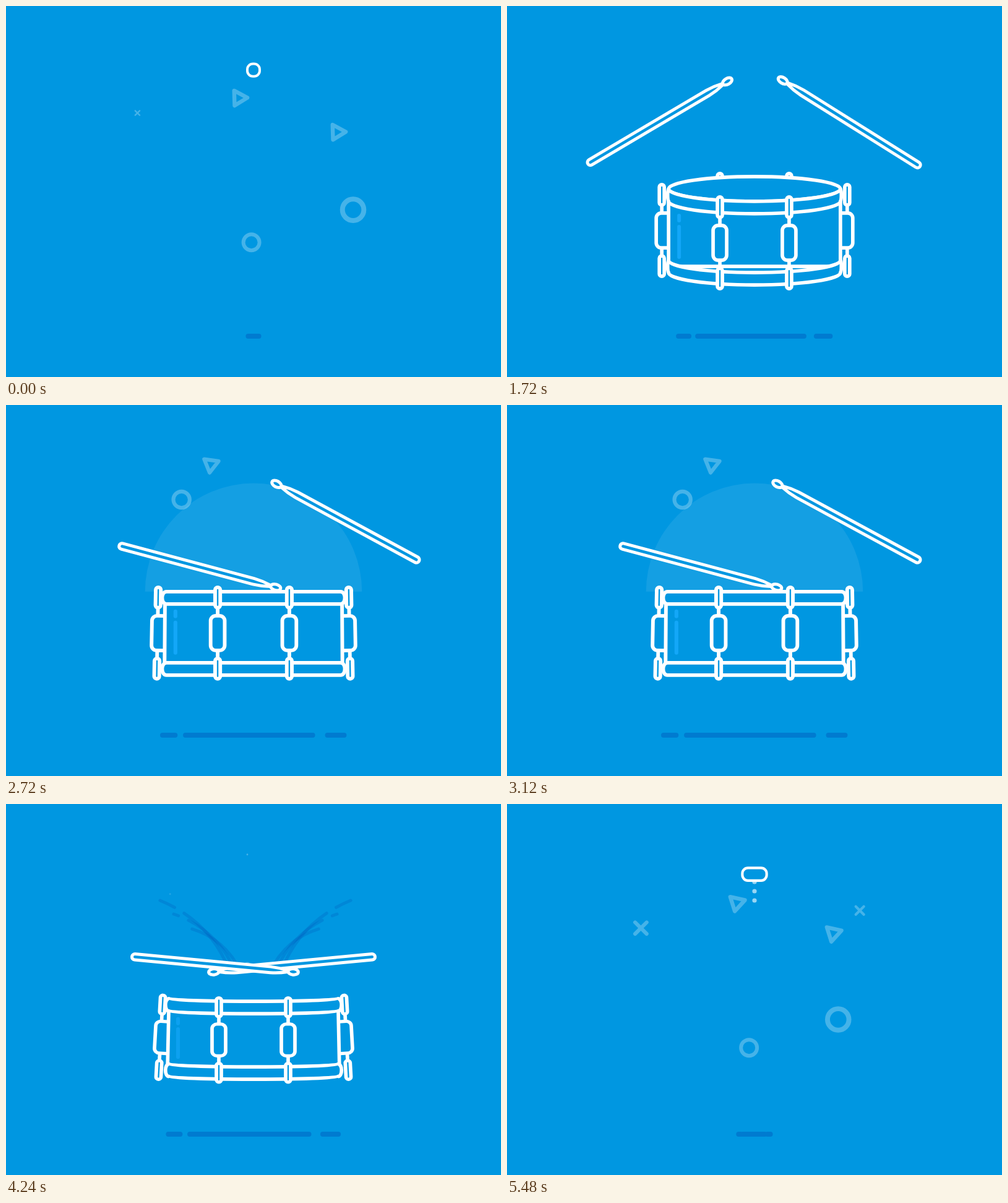
These frames come from a looping animation (800 px wide and 600 px high, 5.52 s). An HTML page with a canvas:

```html
<!DOCTYPE html>
<html>
<head>
<meta charset="utf-8">
<style>
html, body { margin: 0; width: 100%; height: 100%; overflow: hidden; background: #0097e1; }
canvas { display: block; }
</style>
</head>
<body>
<canvas id="stage" width="800" height="600"></canvas>
<script>
const c = document.getElementById('stage').getContext('2d');
const LOOP = 5520, LAND = 1040, OPEN = 1240, SLAM = 4180, CLOSE = 5240;
const ROLL = 2295, BEAT = 400, ROLL_END = 3900;
const BG = '#0097e1', WHITE = '#fff', PALE = 'rgba(255,255,255,.27)';
const RAD = Math.PI / 180, TAU = Math.PI * 2;

const clamp = (v, a = 0, b = 1) => Math.min(b, Math.max(a, v));
const mix = (a, b, w) => a + (b - a) * w;
const smooth = (a, b, t) => { const w = clamp((t - a) / (b - a)); return w * w * (3 - 2 * w); };
const settle = (age, tau) => 1 - Math.exp(-age / tau);
const arch = (a, b, t) => Math.sin(Math.PI * clamp((t - a) / (b - a)));
const kick = (age, up, down) => age < 0 ? 0 : age < up ? age / up : clamp(1 - (age - up) / down);

function pen(color, width) {
  c.strokeStyle = color;
  c.lineWidth = width;
}

function pill(x, y, w, h, r) {
  c.beginPath();
  c.roundRect(x, y, w, h, r);
  c.fill();
  c.stroke();
}

function dot(x, y, r, color) {
  c.fillStyle = color;
  c.beginPath();
  c.arc(x, y, Math.max(0, r), 0, TAU);
  c.fill();
}

function mark(type, x, y, r, turn = 0) {
  if (r < 0.2) return;
  const at = (deg, f) => c[f](x + r * Math.cos(deg * RAD), y + r * Math.sin(deg * RAD));
  pen(PALE, r * 0.46);
  c.beginPath();
  if (type === 'ring') c.arc(x, y, r, 0, TAU);
  if (type === 'cross') for (const a of [turn, turn + 90]) {
    at(a, 'moveTo');
    at(a + 180, 'lineTo');
  }
  if (type === 'tri') {
    at(turn, 'moveTo');
    at(turn + 120, 'lineTo');
    at(turn + 240, 'lineTo');
    c.closePath();
  }
  c.stroke();
}

// type, x, y, radius, drift x, drift y
const launchBits = [
  ['tri', 371, 160, 14, 5, -11],
  ['tri', 527, 209, 14, 8, -5],
  ['ring', 534.5, 349, 17.3, 26, -19],
  ['ring', 391, 394.5, 13, 5.5, -12],
  ['cross', 216.5, 201.5, 13.4, -4, -28],
  ['cross', 570, 172.5, 9.5, 6, -8]
];

function launchBurst(t) {
  const age = t < LAND ? t + 40 : t - 5480;
  if (age < -130 || age > 660) return;
  const g = 3.5 * settle(age, 119);
  const pop = smooth(-130, -50, age) * (1 - smooth(260, 650, age));
  for (const [type, x, y, r, dx, dy] of launchBits) {
    const fade = type === 'cross' ? 1 - clamp(age / (9 * (r - 6))) : 1;
    mark(type, x + dx * g, y + dy * g, r * pop * fade, type === 'cross' ? 45 : -18 + 16 * g);
  }
}

// type, x, y, radius, turn
const impactBits = [
  ['cross', 424, 470, 16.5, 45],
  ['cross', 355, 400.5, 13, 45],
  ['cross', 177.5, 337.5, 12, -5],
  ['ring', 266, 472.5, 11, 0],
  ['ring', 485, 237, 14.3, 0],
  ['tri', 396, 366, 13, 90],
  ['tri', 519, 460, 13, 90]
];

function streak(x, y, dx, dy, bend, w) {
  pen(PALE, w);
  c.beginPath();
  c.moveTo(x, y);
  c.quadraticCurveTo(x + dx / 2 - bend, y + dy / 2, x + dx, y + dy);
  c.stroke();
}

function impact(t) {
  const age = t - LAND;
  if (age < -40 || age > 600) return;
  if (age > 0 && age < 440) {
    const outer = 160 * settle(age, 211), w = Math.min(outer, 66 * (1 - age / 440));
    pen('rgba(0,110,200,.3)', w);
    c.beginPath();
    c.arc(400, 302, outer - w / 2, 0, TAU);
    c.stroke();
  }
  const g = settle(age + 40, 100) / settle(240, 100);
  const s = smooth(-40, 50, age) * (1 - smooth(250, 600, age));
  for (const [type, x, y, r, turn] of impactBits)
    mark(type, mix(400, x, g), mix(320, y, g), r * s, turn);
  c.fillStyle = PALE;
  c.beginPath();
  c.ellipse(400 + 37 * g, 320 - 206 * g, 9 * s, 11 * s, 0.2, 0, TAU);
  c.fill();
  const w = smooth(90, 180, age) * (1 - smooth(210, 380, age)), d = (age - 200) / 8;
  if (w > 0) {
    streak(279 - d, 222 - d, 30, 64, 3, 21 * w);
    streak(584 + d, 180 - d, -78, 101, 5, 16 * w);
  }
}

function hitBits(age, top) {
  if (age < 60 || age > 560) return;
  const glow = 0.08 * smooth(80, 180, age) * (1 - clamp((age - 425) / 70));
  dome(top, 179 * settle(age, 110), glow);
  const rise = settle(age, 100), pop = smooth(60, 160, age);
  mark('tri', 400 - 70 * rise, 300 - 207 * rise, 14 * pop * (1 - smooth(410, 560, age)), 98 + (age - 425) / 10);
  mark('ring', 400 - 118 * rise, 300 - 149 * rise, 13.2 * pop * (1 - smooth(470, 560, age)));
}

function dome(y, r, alpha) {
  c.fillStyle = `rgba(255,255,255,${alpha})`;
  c.beginPath();
  c.arc(400, y, r, Math.PI, TAU);
  c.fill();
}

function sparks(age) {
  if (age < 30 || age > 390) return;
  const s = smooth(30, 60, age) * (1 - smooth(250, 390, age)), up = age / 65;
  dot(390, 300 - 41 * up, 6 * s, PALE);
  mark('cross', 345 - 15 * up, 300 - 29 * up, 5 * s);
}

function hits(t, top) {
  for (let h = ROLL; h < ROLL_END; h += BEAT) {
    if (h < 3800) hitBits(t - h, top);
    if (h > ROLL) sparks(t - h);
  }
  sparks(t - SLAM);
}

function swoosh(t) {
  const alpha = 0.26 * smooth(SLAM - 50, SLAM + 20, t) * (1 - smooth(SLAM + 60, SLAM + 150, t));
  if (alpha <= 0) return;
  pen(`rgba(0,90,185,${alpha})`, 5);
  c.setLineDash([26, 18, 120, 14]);
  for (const side of [-1, 1]) for (let i = 0; i < 3; i++) {
    c.lineDashOffset = 18 * i;
    c.beginPath();
    c.moveTo(403 + side * (154 - 22 * i), 156 + 22 * i);
    c.quadraticCurveTo(403 + side * (72 - 10 * i), 190 + 12 * i, 403 + side * (42 - 9 * i), 270);
    c.stroke();
  }
  c.setLineDash([]);
}

// A pose is lift angle, butt distance from the middle, butt height, size.
function spinIn(age, side) {
  const u = 32 + side - 715 * Math.exp(-age / 88.7);
  const s = Math.sin(clamp(age / 333) * Math.PI / 2);
  const out = arch(180, 420, age);
  const x = 155 * smooth(110, 250, age) + 50 * out;
  const y = 310 - 125 * settle(age, 171) - 60 * out;
  return [u, x + 128 * s * Math.cos(u * RAD), y + 128 * s * Math.sin(u * RAD), s];
}

function drumming(t, side) {
  const apex = side < 0 ? ROLL - BEAT / 2 : ROLL - 13;
  const turn = (side < 0 ? t - apex : Math.max(0, t - apex)) / BEAT * TAU;
  const u = 33 - 25 * (1 - Math.cos(turn));
  return [u, 230 + 1.17 * u, 236 + 0.5 * u, 1];
}

function finale(t) {
  const slam = smooth(SLAM - 100, SLAM + 10, t);
  const u = 55 * smooth(3900, 4080, t) - 67 * slam + 96 * smooth(SLAM, SLAM + 380, t);
  const gather = 1 - smooth(SLAM + 60, 4800, t);
  return [u, (230 + 1.17 * u - 32 * slam) * gather, 236 + 0.5 * u + 14 * slam, 1 - smooth(4500, 4950, t)];
}

function stick(t, side) {
  const age = t - (side < 0 ? 1060 : 1130);
  if (age < 0) return;
  const start = spinIn(age, side), roll = drumming(t, side), end = finale(t);
  const a = smooth(2160, 2260, t), b = smooth(ROLL_END, ROLL_END + 100, t);
  const [u, dx, y, s] = start.map((v, i) => mix(mix(v, roll[i], a), end[i], b));
  if (s < 0.01) return;
  c.save();
  c.translate(400 + side * dx, y);
  c.scale(-side * s, s);
  c.rotate(-u * RAD);
  c.fillStyle = BG;
  pen(WHITE, 5);
  c.beginPath();
  c.arc(0, 0, 4.8, Math.PI / 2, Math.PI * 1.5);
  c.lineTo(220, -4.8);
  c.quadraticCurveTo(234, -4.5, 248, -1);
  c.lineTo(248, 1);
  c.quadraticCurveTo(234, 4.5, 220, 4.8);
  c.closePath();
  c.fill();
  c.stroke();
  c.beginPath();
  c.ellipse(257, 0, 8.2, 4.8, 0, 0, TAU);
  c.fill();
  c.stroke();
  c.restore();
}

function shadow(s) {
  pen('#007bd0', 8);
  c.beginPath();
  for (const [a, b] of [[-123, -106], [-92, 80], [100, 122.5]]) {
    c.moveTo(400 + a * s, 534);
    c.lineTo(400 + b * s, 534);
  }
  c.stroke();
}

const fallY = t => 101 + 229 * clamp((t - 450) / 590) ** 2;
const riseY = t => 101 + 229 * clamp((5555 - t) / 315) ** 2;
const ballHalf = t => 10 + 173 * (t < OPEN ? smooth(LAND, OPEN, t) : clamp((LOOP - t) / 280) ** 1.465);

function ball(t) {
  const y = t < 450 ? riseY(t + LOOP) : t < OPEN ? fallY(t) : riseY(t);
  const half = ballHalf(t), wide = half / 183, tall = mix(10, 12, wide);
  c.fillStyle = BG;
  pen(WHITE, mix(3.8, 7, wide));
  pill(400 - half, y - tall, half * 2, tall * 2, 9);
}

function trail(x, from, a, b) {
  for (let y = from; y < 330; y += 15)
    if (y > a && y < b) dot(x, y, 3.6, 'rgba(255,255,255,.6)');
}

function hoop(y, th, k) {
  const a = y - th / 2, b = y + th / 2, w = 136 + k * 0.15, e = w + 9 - k * 0.35;
  c.beginPath();
  c.ellipse(400 - 400, a, w, k, 0, Math.PI, 0, true);
  c.bezierCurveTo(e, a, e, b, w, b);
  c.ellipse(0, b, w, k, 0, 0, Math.PI);
  c.bezierCurveTo(-e, b, -e, a, -w, a);
  c.closePath();
  c.fill();
  c.stroke();
}

function column(x, y, h, turn) {
  const side = Math.abs(x) > 100, wide = side ? 14 : 11, shift = side ? -Math.sign(x) * 5 : 0;
  c.save();
  c.translate(x, y);
  c.rotate(turn);
  c.scale(1, h);
  c.beginPath();
  c.moveTo(0, -42);
  c.lineTo(0, 42);
  c.stroke();
  pill(shift - wide, -28, wide * 2, 56, 8);
  pill(-4, -74, 8, 33, 4);
  pill(-4, 41, 8, 33, 4);
  c.restore();
}

function shell(top, low, lean) {
  c.beginPath();
  c.moveTo(-139 + lean, top);
  c.lineTo(-139, low);
  c.lineTo(139, low);
  c.lineTo(139 - lean, top);
  c.closePath();
  c.fill();
  c.stroke();
}

function drum({ cy, sx, h, open, bend, tilt }) {
  const built = clamp(h * 3), th = mix(24, 20, built), k = open + bend;
  const top = -57 * h, low = 58 * h, parts = h > 0.04;
  c.save();
  c.translate(400, cy);
  c.scale(sx, 1);
  c.fillStyle = BG;
  pen(WHITE, mix(7, 5.7, built));
  if (parts) {
    if (open > 1) for (const x of [-56, 56]) pill(x - 4, -74 * h - open + 2, 8, 33 * h, 4);
    for (const s of [-1, 1]) column(150 * s, 0, h, -s * tilt);
    shell(top, low, tilt * 40);
  }
  hoop(low, th, k);
  if (open > 0.3) {
    c.beginPath();
    c.ellipse(0, top - th / 2, 139, open, 0, 0, TAU);
    c.fill();
    c.stroke();
  }
  hoop(top, th, k);
  if (parts) {
    for (const x of [-56, 56]) column(x, k, h, 0);
    pen(`rgba(25,172,255,${0.75 * clamp(h * 4 - 3)})`, 6);
    c.beginPath();
    for (const [a, b] of [[-35, -27], [-17, 32]]) {
      c.moveTo(-122, a * h + k * 0.55);
      c.lineTo(-122, b * h + k * 0.55);
    }
    c.stroke();
  }
  c.restore();
}

// Each stick gives the drum a short squash on every beat.
function pulse(t) {
  if (t > ROLL_END) return 0;
  const beat = first => t < first ? 0 : kick((t - first) % BEAT, 25, 44);
  return Math.max(beat(ROLL), beat(ROLL + 187));
}

// The drum unfolds from the bar with a wobble and folds back the same way.
function drumState(t) {
  const age = Math.max(0, Math.min(t - OPEN, CLOSE - t));
  const p = pulse(t), slam = kick(t - SLAM, 30, 150), wobble = Math.exp(-age / 90);
  return {
    cy: 329 + 34 * smooth(0, 400, age) + 6 * p + 18 * slam,
    sx: 1 + 0.28 * wobble * Math.cos(age / 300 * TAU) + 0.035 * p,
    h: 1 - wobble * Math.cos(age / 360 * TAU) - 0.1 * slam,
    open: 20 * (smooth(OPEN, OPEN + 400, t) - smooth(2190, 2290, t)),
    bend: 5.5 * slam + 4 * Math.exp(-age / 60),
    tilt: 0.018 * p + 0.07 * slam,
    shade: 0.165 * p + 0.15 * slam
  };
}

function draw(t) {
  const d = drumState(t), folded = t < OPEN || t > CLOSE;
  c.fillStyle = BG;
  c.fillRect(0, 0, 800, 600);
  c.lineCap = c.lineJoin = 'round';
  shadow(folded ? ballHalf(t > CLOSE ? Math.max(CLOSE, t - 25) : t) / 143 : d.sx + d.shade);
  impact(t);
  launchBurst(t);
  hits(t, d.cy - 67);
  swoosh(t);
  if (t < 1400) trail(400 - 10 * smooth(LAND, OPEN, t), 118, fallY(t - 340), fallY(t));
  if (t > CLOSE) trail(400, 111, riseY(t), riseY(t - 85));
  stick(t, 1);
  stick(t, -1);
  if (folded) ball(t);
  else drum(d);
}

const start = performance.now();
function frame(now) {
  draw(Math.max(0, now - start) % LOOP);
  requestAnimationFrame(frame);
}
draw(0);
requestAnimationFrame(frame);
</script>
</body>
</html>
```
